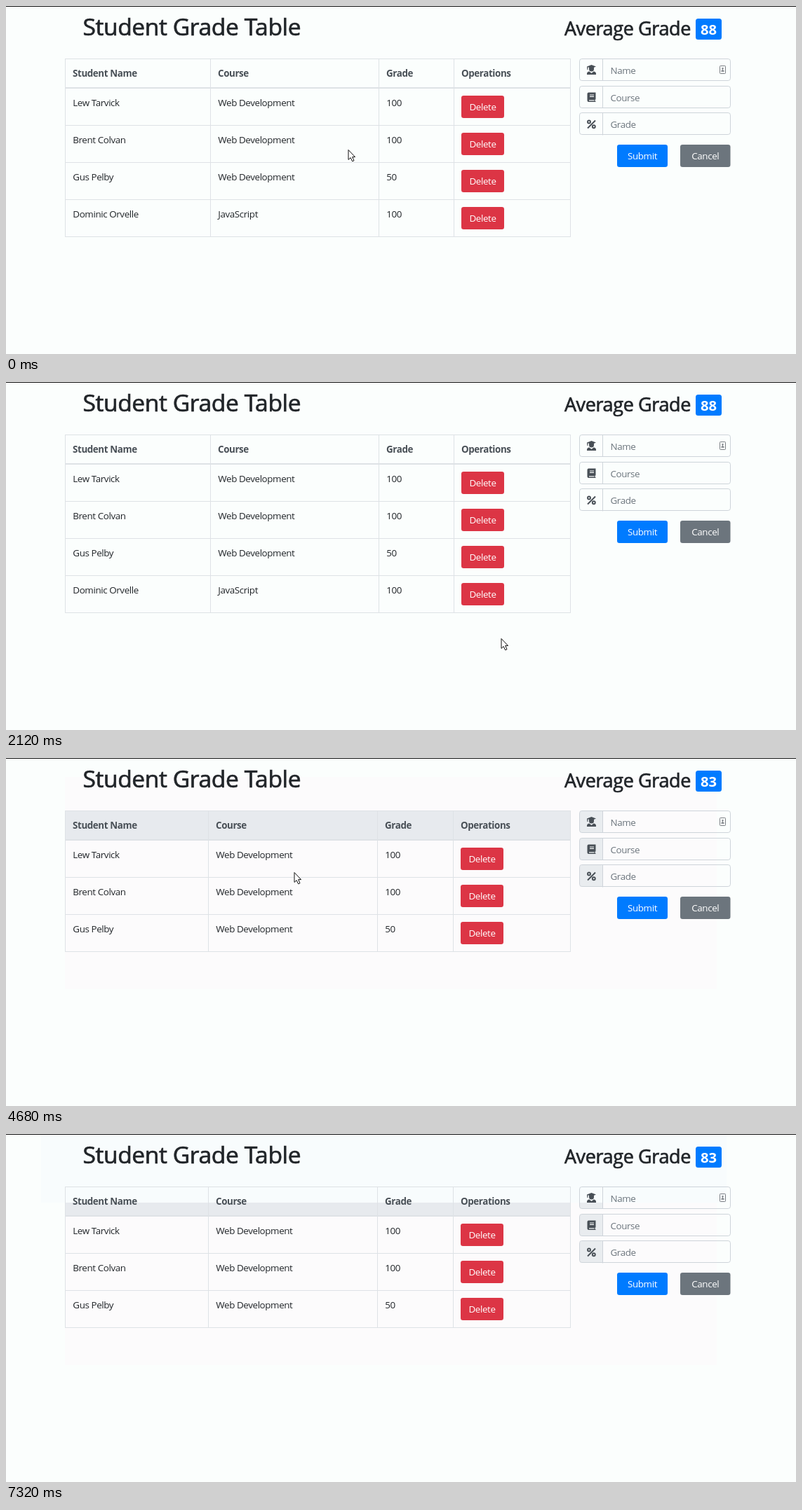
An HTML page for the animation above (8 s loop, 1126 by 497 pixels).

```html
<!DOCTYPE html>
<html lang="en">
<head>
<meta charset="utf-8">
<title>Student Grade Table</title>
<style>
html, body { margin: 0; width: 100%; height: 100%; overflow: hidden; background: #fbfefd; }
svg { display: block; width: 1126px; height: 497px; }
text { font: 13.4px "Open Sans", "Noto Sans", sans-serif; letter-spacing: -.03em; fill: #212529; }
.title, .subtitle { letter-spacing: -.012em; stroke: #212529; stroke-width: .7px; }
.title { font-size: 33.6px; }
.subtitle { font-size: 26.9px; text-anchor: end; }
.badge { font-size: 20.2px; font-weight: 700; letter-spacing: 0; fill: #fff; text-anchor: middle; }
.head { font-weight: 700; fill: #495057; }
.hint { fill: #6c757d; }
.label { fill: #fff; text-anchor: middle; }
.grid { fill: none; stroke: #dee2e6; }
.field { fill: none; stroke: #ced4da; }
.icon { fill: #495057; }
</style>
</head>
<body>
<svg id="stage" viewBox="0 0 1126 497"></svg>
<script>
const LOOP = 8000, DELETED = 3630, RELOAD = 7000, LOADED = 7140, READY = 7320;
const RED = '#dc3545', RED_HOVER = '#c82333', RED_ACTIVE = '#bd2130';
const stage = document.getElementById('stage');

function add(parent, tag, attrs = {}, content) {
  const node = document.createElementNS('http://www.w3.org/2000/svg', tag);
  for (const key in attrs) node.setAttribute(key, attrs[key]);
  if (content !== undefined) node.textContent = content;
  parent.append(node);
  return node;
}
const group = (parent = stage) => add(parent, 'g');
const rect = (parent, x, y, width, height, attrs) => add(parent, 'rect', { x, y, width, height, ...attrs });
const path = (parent, d, attrs) => add(parent, 'path', { d, ...attrs });
const label = (parent, x, y, content, cls = '') => add(parent, 'text', { x, y, class: cls }, content);
const show = (node, on) => node.setAttribute('visibility', on ? 'visible' : 'hidden');

function button(parent, x, y, width, fill, content) {
  const box = rect(parent, x, y, width, 32, { rx: 3.3, fill });
  label(parent, x + width / 2, y + 21, content, 'label');
  return { box, x, y, width };
}

function table(cols, rows) {
  const root = group(), buttons = [];
  const bottom = rows.length ? 118 + rows.length * 53 : 118;
  const tops = rows.map((_, i) => 117 + i * 53);
  const lines = [...cols, 804.5].map(x => `M${x} 75V${bottom}`)
    .concat(tops.map(y => `M84 ${y + 53.5}H805`)).join('');
  path(root, `M84 75.5H805${lines}`, { class: 'grid' });
  path(root, 'M84 117H805', { class: 'grid', 'stroke-width': 2 });
  ['Student Name', 'Course', 'Grade', 'Operations']
    .forEach((name, i) => label(root, cols[i] + 10.5, 101, name, 'head'));
  rows.forEach((row, i) => {
    row.forEach((cell, c) => label(root, cols[c] + 10.8, tops[i] + 26, cell));
    buttons.push(button(root, cols[3] + 10.5, tops[i] + 11, 61, RED, 'Delete'));
  });
  return { root, buttons };
}

// Background tones
rect(stage, 0, 0, 1126, 497, { fill: '#fbfefd' });
const fieldTops = [75, 114, 152.5];
const shade = group();
rect(shade, 84, 27, 929, 303, { fill: '#fcfbfc' });
rect(shade, 84, 75, 721, 42, { fill: '#e7eaee' });
fieldTops.forEach(y => rect(shade, 818, y + .5, 33, 31, { rx: 3, fill: '#e9ecef' }));
const tint = rect(stage, 50, 1, 977, 97, { fill: '#f8fcfd' });
rect(stage, 0, 0, 1126, 1, { fill: '#111' });

// Headings
label(stage, 109.5, 41.5, 'Student Grade Table', 'title');
const average = label(stage, 976, 41.5, 'Average Grade', 'subtitle');
const badge = rect(stage, 983, 18, 37, 30, { rx: 3.5, fill: '#007bff' });
const score = label(stage, 1001.5, 41, '88', 'badge');

// Tables
const students = [
  ['Lew Tarvick', 'Web Development', '100'],
  ['Brent Colvan', 'Web Development', '100'],
  ['Gus Pelby', 'Web Development', '50'],
  ['Dominic Orvelle', 'JavaScript', '100']
];
const full = table([84.5, 291.5, 531.5, 638.5], students);
const shorter = table([84.5, 288.5, 529.5, 637.5], students.slice(0, 3));
const empty = table([84.5, 331.5, 473.5, 603.5], []);
const last = full.buttons[3];
const ring = rect(full.root, last.x - 1.3, last.y - 1.3, 63.6, 34.6,
  { rx: 4.5, fill: 'none', stroke: '#e15361', 'stroke-opacity': .5, 'stroke-width': 2.7 });

// Form
['Name', 'Course', 'Grade'].forEach((hint, i) => {
  const y = fieldTops[i];
  rect(stage, 817.5, Math.floor(y) + .5, 215, 31, { rx: 3.3, class: 'field' });
  path(stage, `M850.5 ${y}v32`, { class: 'field' });
  label(stage, 861.5, y + 21.5, hint, 'hint');
});
path(stage, 'M828 86.5L834.5 84L841 86.5L838 87.8V90A3.5 3.5 0 0 1 831 90V87.8L829.4 87.2V91H828.4Z'
  + 'M828 98V96.8Q828 94 831.5 93.6L834.5 96L837.5 93.6Q841 94 841 96.8V98Z', { class: 'icon' });
path(stage, 'M830.5 123.5H840.5V133.5H839.7V136H840.5V137H830.5Q828.5 137 828.5 135V125.5Q828.5 123.5 830.5 123.5Z',
  { class: 'icon' });
path(stage, 'M832 127H838M832 129.3H838M831 134.8H838.5', { stroke: '#f4f6f7', 'stroke-width': 1.2 });
const percent = add(stage, 'g', { fill: 'none', stroke: '#495057', 'stroke-width': 1.9 });
add(percent, 'circle', { cx: 831, cy: 165.5, r: 2 });
add(percent, 'circle', { cx: 837.8, cy: 172.3, r: 2 });
path(percent, 'M829 174.5L840 163.5');
const autofill = group();
rect(autofill, 1017.5, 85.5, 8, 11, { rx: .8, fill: 'none', stroke: '#7b7f84' });
path(autofill, 'M1020.5 88h2v2h-2ZM1020.9 90h1.2v2h-1.2ZM1019.5 92h4v1.8h-4Z', { fill: '#7b7f84' });
button(stage, 871, 198, 72, '#007bff', 'Submit');
button(stage, 961, 198, 71.5, '#6c757d', 'Cancel');

// Pointer
const pointer = add(stage, 'g', { fill: '#fff', stroke: '#111', 'stroke-linejoin': 'round' });
const arrow = path(pointer, 'M0 .5V14.5L3.2 11.6L5.6 16.8L8 15.8L5.7 10.6H9.6Z');
const hand = group(pointer);
path(hand, 'M-1.5 1.5Q0 -.8 1.5 1.5V7Q3.5 5.8 4.3 7.8Q6 6.8 6.8 8.7Q8.5 8 9 10V14Q8.5 16 7.2 17V19.5H-1.2V17.5'
  + 'L-5 12.5Q-5.8 10 -3.5 10L-1.5 12Z');
path(hand, 'M1.5 7V10M4.3 8V10.5M6.8 9V11', { fill: 'none', 'stroke-width': .8 });

// time, x, y
const route = [
  [470, 488, 205], [620, 503, 213], [760, 540, 230], [870, 590, 241], [960, 640, 258], [1040, 690, 272],
  [1110, 724, 289], [1190, 700, 311], [1250, 650, 302], [1290, 628, 284], [1320, 628, 284],
  [1370, 626, 264], [1410, 640, 252], [1460, 680, 271], [1530, 718, 292], [1580, 712, 322],
  [1630, 690, 334], [1690, 690, 334], [1830, 642, 346], [1970, 668, 362], [2120, 706, 366], [2180, 714, 364],
  [2300, 734, 348], [2420, 715, 326], [2590, 688, 304], [DELETED, 687, 304], [4400, 687, 304],
  [4450, 625, 272], [4500, 565, 240], [4550, 513, 223], [4600, 475, 198], [4650, 411, 163],
  [4700, 313, 117], [4750, 265, 83], [5050, 265, 83], [5200, 202, 53], [5520, 95, -18]
];

function pointerAt(time) {
  const t = time >= 4400 && time < 4800 ? Math.floor(time / 50) * 50 : time;
  const next = route.findIndex(p => p[0] > t);
  if (next < 0) return route.at(-1).slice(1);
  if (next === 0) return route[0].slice(1);
  const [t0, x0, y0] = route[next - 1], [t1, x1, y1] = route[next];
  const k = (t - t0) / (t1 - t0);
  return [x0 + (x1 - x0) * k, y0 + (y1 - y0) * k];
}

function setAverage(value) {
  const width = value.length > 1 ? 37 : 25.5;
  score.textContent = value;
  badge.setAttribute('x', 1020 - width);
  badge.setAttribute('width', width);
  score.setAttribute('x', 1020 - width / 2);
  average.setAttribute('x', 1013 - width);
}

function draw(t) {
  const before = t < DELETED, loading = t >= RELOAD && t < LOADED;
  const pressed = before && t >= 3110;
  show(full.root, before);
  show(shorter.root, !before && !loading);
  show(empty.root, loading);
  show(shade, !before);
  show(tint, t >= READY);
  show(autofill, t < RELOAD || t >= READY);
  show(ring, pressed);
  ring.setAttribute('opacity', t < 3160 ? .5 : 1);
  setAverage(before ? '88' : loading ? '0' : '83');

  const [x, y] = pointerAt(t);
  let hovering = false;
  full.buttons.forEach(b => {
    const over = before && x >= b.x && x <= b.x + b.width && y >= b.y && y <= b.y + 32;
    hovering ||= over;
    b.box.setAttribute('fill', !over ? RED : pressed && b === last ? RED_ACTIVE : RED_HOVER);
  });
  const visible = t < 5520;
  pointer.setAttribute('transform', `translate(${Math.round(x)} ${Math.round(y)})`);
  show(arrow, visible && !hovering);
  show(hand, visible && hovering);
}

const start = performance.now();
function tick() {
  draw((performance.now() - start) % LOOP);
  requestAnimationFrame(tick);
}
tick();
</script>
</body>
</html>
```
